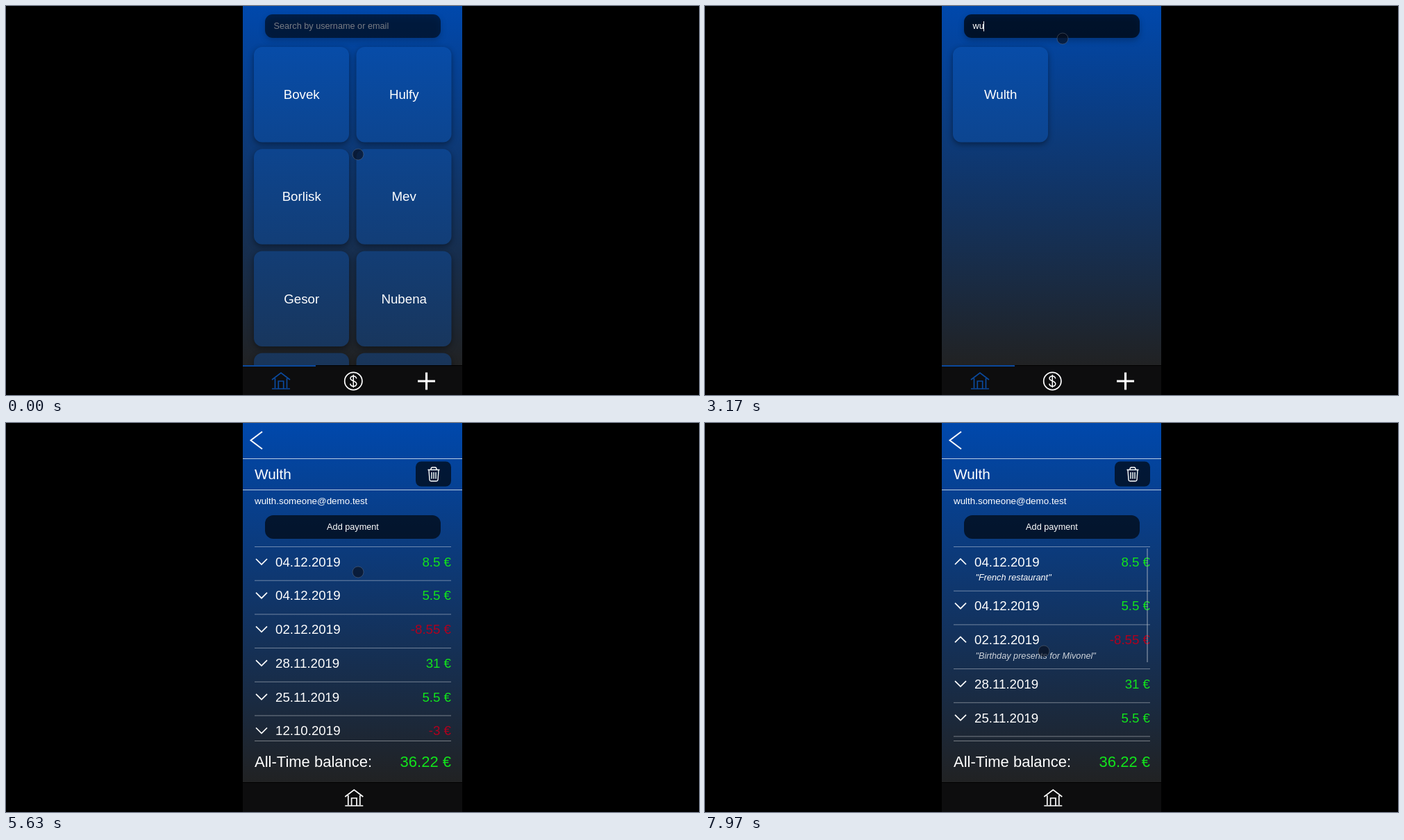
These frames come from a looping animation (998x561 px, 8 s). An HTML page:

```html
<!DOCTYPE html>
<html lang="en">
<head>
<meta charset="utf-8">
<title>Shared expenses</title>
<style>
  html, body { margin: 0; width: 100%; height: 100%; overflow: hidden; background: #000; }
  svg { display: block; width: 998px; height: 561px; }
  text { font-family: "Liberation Sans", Arial, sans-serif; font-size: 18.7px; fill: #fff; }
  .mid { text-anchor: middle; }
  .end { text-anchor: end; }
  .small { font-size: 12.7px; }
  .note { font-size: 12.7px; font-style: italic; }
  .big { font-size: 22px; }
  .hint { fill: #787c84; }
  .gain { fill: #12e31c; }
  .loss { fill: #b0001e; }
  .icon { fill: none; stroke: #fff; stroke-width: 1.7; }
  .rule { stroke: #fff; stroke-opacity: .4; }
  .edge { stroke: #fff; stroke-opacity: .72; }
  .card { fill: url(#cardFill); filter: drop-shadow(0 3px 4px rgba(0, 0, 0, .42)); }
  .field { filter: drop-shadow(0 4px 4px rgba(0, 0, 0, .35)); }
</style>
</head>
<body>
<svg viewBox="0 0 998 561">
  <defs>
    <linearGradient id="pageFill" gradientUnits="userSpaceOnUse" x1="0" y1="0" x2="0" y2="518">
      <stop stop-color="#0048ac"/><stop offset="1" stop-color="#212223"/>
    </linearGradient>
    <linearGradient id="cardFill" gradientUnits="userSpaceOnUse" x1="0" y1="0" x2="0" y2="518">
      <stop stop-color="#054fb2"/><stop offset="1" stop-color="#193559"/>
    </linearGradient>
    <clipPath id="pageClip"><rect x="341" width="316" height="518"/></clipPath>
    <clipPath id="listClip"><rect x="341" y="178" width="316" height="280"/></clipPath>
    <g id="house">
      <path d="M-13 -2 L0 -12 L13 -2 M-8.5 -4 V10 M8.5 -4 V10 M-13 11 H13 M-3.7 11 V0 H3.7 V11"/>
    </g>
  </defs>

  <rect width="998" height="561"/>
  <rect x="341" width="316" height="518" fill="url(#pageFill)"/>
  <rect x="341" y="518" width="316" height="43" fill="#0d0d0e"/>
  <path d="M341 518.5 H657" stroke="#000"/>

  <g id="home">
    <g id="cards" clip-path="url(#pageClip)"></g>
    <rect id="search" class="field" x="373" y="12" width="253" height="34" rx="11"/>
    <text id="query" class="small" x="385.5" y="33"></text>
    <path id="caret" d="M0 22 V36.5" stroke="#fff"/>
    <rect x="341" y="518" width="105" height="2" fill="#0a489c"/>
    <use href="#house" class="icon" x="396" y="541" style="stroke:#0b4a9e"/>
    <g class="icon">
      <circle cx="500.3" cy="541" r="12.6"/>
      <path d="M504.7 537.5 C504 532.7 496 532.7 496 537 C496 541.5 504.8 540 504.8 545 C504.8 549.6 496.3 549.6 495.8 544.6 M500.3 531.8 V550.2" stroke-width="1.5"/>
      <path d="M593 541 H618 M605.5 528.5 V553.5" stroke-width="3.2"/>
    </g>
  </g>

  <g id="detail">
    <path class="icon" d="M369 12.5 L352.5 25 L369 37.5" style="stroke-width:2"/>
    <path class="edge" d="M341 51.5 H657 M341 96.5 H657"/>
    <text x="358" y="81" style="font-size:20.8px">Wulth</text>
    <rect x="590" y="55.5" width="51" height="36" rx="8" fill-opacity=".65"/>
    <g class="icon" style="stroke-width:1.4">
      <path d="M607.5 67.5 H624.5 M612 67 Q612 64 614 64 H618 Q620 64 620 67 M609 68 L610 82 Q610.2 83.7 612 83.7 H620 Q621.8 83.7 622 82 L623 68 M613 71 V80.5 M616 71 V80.5 M619 71 V80.5"/>
    </g>
    <text x="358" y="117" style="font-size:13.4px">wulth.someone@demo.test</text>
    <rect x="373" y="133" width="253" height="34" rx="12" fill-opacity=".65"/>
    <text class="small mid" x="499.5" y="154">Add payment</text>
    <g id="list" clip-path="url(#listClip)"></g>
    <path class="rule" d="M358 458.5 H641"/>
    <rect id="scrollbar" x="636" y="181" width="2" fill="#aab4c0" fill-opacity=".45"/>
    <text class="big" x="358" y="495.5">All-Time balance:</text>
    <text class="big gain end" x="641" y="495.5">36.22 €</text>
    <use href="#house" class="icon" x="501.3" y="541"/>
  </g>

  <circle id="pointer" r="8" fill="#080e1c" fill-opacity=".65" stroke="#8a9099" stroke-opacity=".35"/>
</svg>
<script>
const LOOP = 8000, FOCUS = 1230, TYPE = [2530, 2970], OPEN = 3930;
const ROW = 48.7, NOTE = 15;
const NAMES = ["Bovek", "Hulfy", "Borlisk", "Mev", "Gesor", "Nubena", "", ""];
const PAYMENTS = [
  { date: "04.12.2019", sum: "8.5 €", note: '"French restaurant"', at: 6260 },
  { date: "04.12.2019", sum: "5.5 €" },
  { date: "02.12.2019", sum: "-8.55 €", note: '"Birthday presents for Mivonel"', at: 7720 },
  { date: "28.11.2019", sum: "31 €" },
  { date: "25.11.2019", sum: "5.5 €" },
  { date: "12.10.2019", sum: "-3 €" }
];
// Pointer stops: time, x, y
const PATH = [
  [0, 507, 214], [300, 507, 214], [1100, 515, 47], [3250, 515, 47], [3800, 460, 156],
  [4500, 460, 156], [5250, 507, 215], [5750, 507, 215], [6150, 507, 226],
  [6850, 507, 226], [7600, 488, 329], [LOOP, 488, 329]
];

const $ = id => document.getElementById(id);
const clamp = v => v < 0 ? 0 : v > 1 ? 1 : v;
const ease = v => v * v * (3 - 2 * v);
const progress = (t, start, span) => clamp((t - start) / span);
const show = (node, on) => node.setAttribute("display", on ? "inline" : "none");

function add(parent, tag, attrs, text) {
  const node = document.createElementNS("http://www.w3.org/2000/svg", tag);
  for (const key in attrs) node.setAttribute(key, attrs[key]);
  if (text) node.textContent = text;
  return parent.appendChild(node);
}

function addCard(parent, index, name) {
  const x = 357 + index % 2 * 147.5, y = 59 + Math.floor(index / 2) * 147.2;
  add(parent, "rect", { class: "card", x, y, width: 137, height: 137.5, rx: 12 });
  add(parent, "text", { class: "mid", x: x + 68.7, y: y + 75.2 }, name);
}

const everyone = add($("cards"), "g", {});
const match = add($("cards"), "g", {});
NAMES.forEach((name, i) => addCard(everyone, i, name));
addCard(match, 0, "Wulth");

const rows = PAYMENTS.map(pay => {
  const group = add($("list"), "g", {});
  add(group, "path", { class: "rule", d: "M358 .5 H641" });
  const chevron = add(group, "path", { class: "icon" });
  add(group, "text", { x: 388, y: 28.8 }, pay.date);
  add(group, "text", { class: "end " + (pay.sum[0] === "-" ? "loss" : "gain"), x: 641, y: 28.8 }, pay.sum);
  const note = pay.note && add(group, "text", { class: "note", x: 389.5, y: 49.2 }, pay.note);
  return { ...pay, group, chevron, note };
});

function drawPointer(t) {
  const i = PATH.findIndex(stop => stop[0] > t);
  const [t0, x0, y0] = PATH[i - 1], [t1, x1, y1] = PATH[i];
  const k = ease((t - t0) / (t1 - t0));
  $("pointer").setAttribute("cx", x0 + (x1 - x0) * k);
  $("pointer").setAttribute("cy", y0 + (y1 - y0) * k);
}

function drawHome(t) {
  const typed = "wu".slice(0, TYPE.filter(at => t >= at).length);
  const query = $("query");
  show(everyone, !typed);
  show(match, typed);
  query.textContent = typed || "Search by username or email";
  query.setAttribute("class", typed ? "small" : "small hint");
  $("search").setAttribute("fill-opacity", .55 + .12 * progress(t, FOCUS, 150));
  const lastKey = [FOCUS, ...TYPE].filter(at => t >= at).pop();
  show($("caret"), t >= FOCUS && (t - lastKey) % 1000 < 500);
  const caretX = typed ? 385.5 + query.getComputedTextLength() : 386;
  $("caret").setAttribute("transform", `translate(${Math.floor(caretX) + .5})`);
}

function drawDetail(t) {
  let y = 178, barHeight = 174, lastChange = OPEN;
  for (const row of rows) {
    const open = row.note ? ease(progress(t, row.at, 130)) : 0;
    const tip = 8 * open;
    row.group.setAttribute("transform", `translate(0 ${y})`);
    row.chevron.setAttribute("d", `M360 ${18 + tip} L368 ${26 - tip} L376 ${18 + tip}`);
    if (row.note) row.note.setAttribute("opacity", progress(t, row.at, 320));
    if (t >= row.at) lastChange = row.at;
    y += ROW + NOTE * open;
    barHeight -= 5 * open;
  }
  $("scrollbar").setAttribute("height", barHeight);
  $("scrollbar").setAttribute("opacity", 1 - progress(t, lastChange + 500, 300));
}

function draw(t) {
  show($("home"), t < OPEN);
  show($("detail"), t >= OPEN);
  (t < OPEN ? drawHome : drawDetail)(t);
  drawPointer(t);
}

const start = performance.now();
function tick() {
  draw((performance.now() - start) % LOOP);
  requestAnimationFrame(tick);
}
tick();
</script>
</body>
</html>
```
